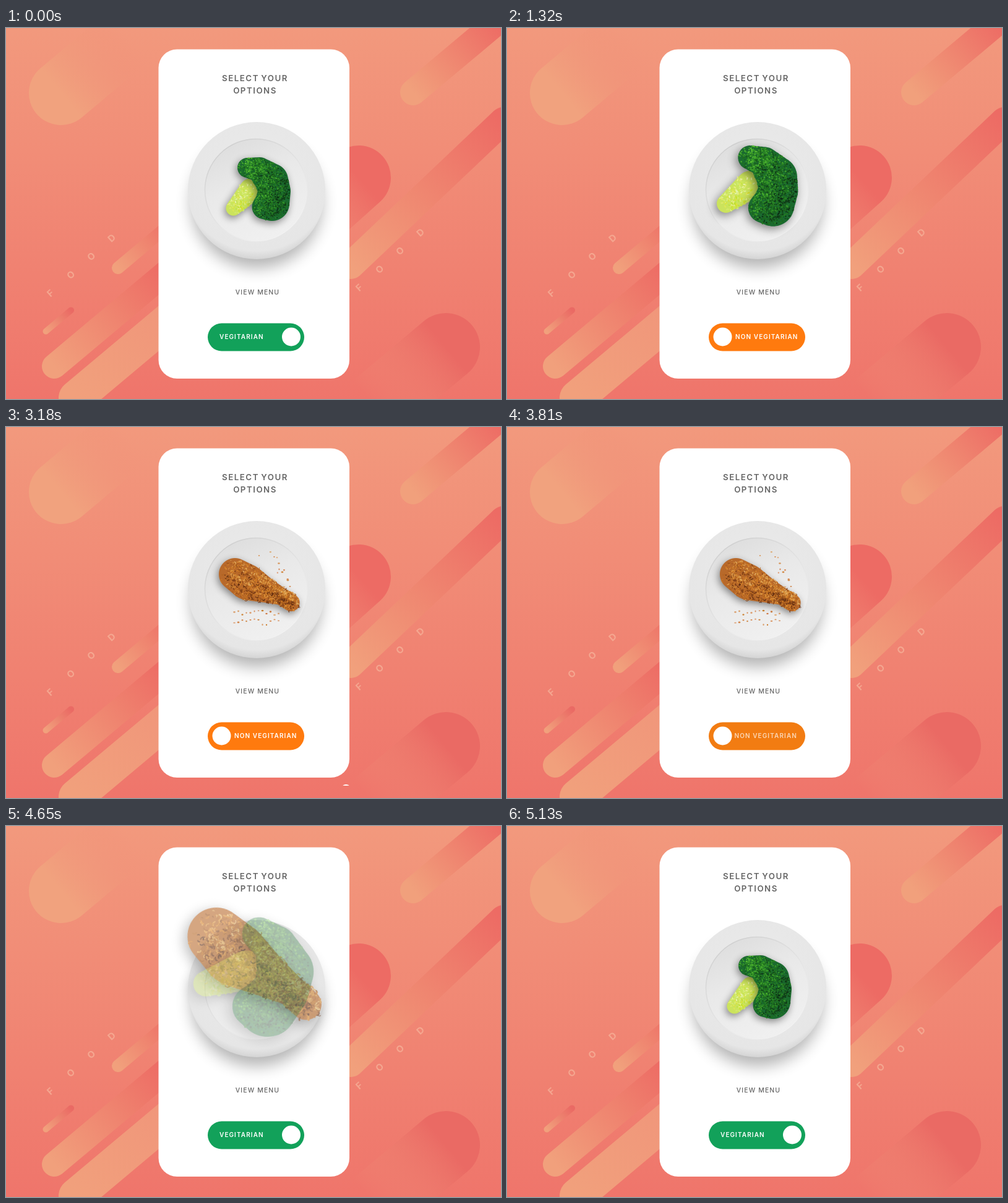
These frames come from a looping animation (800x600 px, 5.79 s). An HTML page with a canvas:

```html
<!DOCTYPE html>
<html lang="en">
<head>
<meta charset="utf-8">
<title>Select your options</title>
<style>
  html, body { margin: 0; width: 100%; height: 100%; overflow: hidden; }
  svg { position: absolute; left: 0; top: 0; }
  text { font-family: Inter, "Open Sans", sans-serif; }
  canvas { position: absolute; left: 300px; top: 160px; width: 220px; height: 200px; }
  .title { font-size: 13.3px; font-weight: 600; letter-spacing: 1.5px; word-spacing: -1.5px; }
  .label { font-size: 10px; font-weight: 600; letter-spacing: 1.1px; fill: #fff; }
  .food { font-size: 15px; font-weight: 700; fill: #f8bfa4; opacity: .6; text-anchor: middle; }
</style>
</head>
<body>
<svg width="800" height="600" viewBox="0 0 800 600">
  <defs>
    <linearGradient id="sky" x2="0" y2="1">
      <stop stop-color="#f2997d"/><stop offset="1" stop-color="#ef756b"/>
    </linearGradient>
    <radialGradient id="rim" cy=".4" r=".62">
      <stop stop-color="#ebebeb"/><stop offset=".87" stop-color="#e6e6e6"/><stop offset="1" stop-color="#cecece"/>
    </radialGradient>
    <linearGradient id="well" x1=".15" x2=".6" y2="1">
      <stop stop-color="#dcdcdc"/><stop offset=".45" stop-color="#e9e9e9"/><stop offset="1" stop-color="#f0f0f0"/>
    </linearGradient>
    <linearGradient id="lip" x1=".1" x2=".8" y2="1">
      <stop stop-color="#cbcbcb"/><stop offset=".6" stop-color="#e6e6e6"/><stop offset="1" stop-color="#f4f4f4"/>
    </linearGradient>
    <filter id="blur" x="-30%" y="-30%" width="160%" height="160%"><feGaussianBlur stdDeviation="13"/></filter>
    <clipPath id="frame"><rect width="800" height="580"/></clipPath>
  </defs>
  <rect width="800" height="600" fill="url(#sky)"/>
  <g id="back"></g>
  <rect x="246.500" y="34.500" width="308.500" height="532.500" rx="30" fill="#fff"/>
  <g fill="#666" text-anchor="middle">
    <text class="title" x="402.500" y="86">SELECT YOUR</text>
    <text class="title" x="402.500" y="106">OPTIONS</text>
    <text x="406.500" y="431" font-size="10.500" font-weight="500" letter-spacing="1.1">VIEW MENU</text>
  </g>
  <circle cx="405" cy="283" r="105" opacity=".3" filter="url(#blur)"/>
  <circle cx="405" cy="263" r="111" fill="url(#rim)"/>
  <circle cx="404" cy="262" r="82.500" fill="url(#well)" stroke="url(#lip)" stroke-width="1.500"/>
  <g id="crumbs"></g>
  <rect id="track" x="326" y="477.500" width="156" height="45" rx="22.500"/>
  <text id="veg" class="label" y="503">VEGITARIAN</text>
  <text id="non" class="label" y="503">NON VEGITARIAN</text>
  <circle id="knob" cy="499.500" r="15" fill="#fff"/>
  <g clip-path="url(#frame)"><circle id="dot" r="8" fill="#fff"/></g>
</svg>
<script>
const $ = id => document.getElementById(id);
const LOOP = 5790, SCALE = 2, TAU = 2 * Math.PI;
const GREEN = [18, 161, 90], ORANGE = [255, 122, 14];
const LIGHT = '#f1a07c', RED = '#ed6b64', CLEAR = '#f0907800';

let seed = 7;
const rand = () => (seed = seed * 16807 % 2147483647) / 2147483647;
const spread = r => (rand() * 2 - 1) * r;
const mix = (a, b, p) => a + (b - a) * p;

// Capsule rising to the right from a round end, with a gradient along its length
function capsule(x, y, r, length, from, to, angle = 40) {
  const id = `cap${x}`, a = angle * Math.PI / 180;
  const x2 = x + length * Math.cos(a), y2 = y - length * Math.sin(a);
  return `<linearGradient id="${id}" gradientUnits="userSpaceOnUse" x1="${x}" y1="${y}" x2="${x2}" y2="${y2}">
    <stop stop-color="${from}"/><stop offset="1" stop-color="${to}"/></linearGradient>
    <path d="M${x} ${y}L${x2} ${y2}" stroke="url(#${id})" stroke-width="${2 * r}" stroke-linecap="round"/>`;
}
const foodWord = (x, y) => [...'FOOD'].map((c, i) =>
  `<text class="food" transform="translate(${x + 33 * i} ${y - 29.700 * i}) rotate(-42)" y="5">${c}</text>`).join('');

$('back').innerHTML =
  capsule(89, 105, 52, 140, '#f1a27e', CLEAR) +
  capsule(658, 104, 21, 180, LIGHT, RED) +
  capsule(570, 242, 52, 200, RED, CLEAR, 222) +
  capsule(557, 384, 22, 340, LIGHT, RED, 43.500) +
  capsule(711, 516, 55, 150, '#ea6a64', CLEAR, 220) +
  capsule(181, 388, 10, 120, LIGHT, RED) +
  capsule(64.500, 490.500, 5, 53, LIGHT, '#ea6a64') +
  capsule(78, 547, 20, 240, LIGHT, RED) +
  capsule(113, 598, 28, 270, LIGHT, '#f0937a') +
  foodWord(72, 429) + foodWord(571, 420);

// Food bodies are chains of discs [x, y, r]; p from 0 to 1 runs along the chain
function discAt(chain, p) {
  const q = p * (chain.length - 1), i = Math.min(chain.length - 2, Math.floor(q));
  return chain[i].map((v, k) => mix(v, chain[i + 1][k], q - i));
}
function fillChain(g, chain, color) {
  const path = new Path2D();
  for (let p = 0; p <= 1; p += .02) {
    const [x, y, r] = discAt(chain, p);
    path.moveTo(x + r, y);
    path.arc(x, y, r, 0, TAU);
  }
  g.shadowColor = 'rgba(0,0,0,.45)';
  g.shadowBlur = 12 * SCALE;
  g.shadowOffsetX = -2 * SCALE;
  g.shadowOffsetY = 4 * SCALE;
  g.fillStyle = color;
  g.fill(path);
  g.shadowColor = 'transparent';
}
// Calls draw(x, y, u, v) at random points; u, v is the place within the disc, -1 to 1
function scatter(chain, count, draw) {
  while (count--) {
    const [x, y, r] = discAt(chain, rand());
    const d = Math.sqrt(rand()), a = rand() * TAU;
    const u = d * Math.cos(a), v = d * Math.sin(a);
    draw(x + u * r, y + v * r, u, v);
  }
}
function curl(g, x, y, r, sweep, width, color) {
  const turn = rand() * TAU;
  g.strokeStyle = color;
  g.lineWidth = width;
  g.beginPath();
  g.arc(x, y, r, turn, turn + sweep);
  g.stroke();
}
function sprite(px, py) {
  const el = document.createElement('canvas');
  el.width = 220 * SCALE;
  el.height = 200 * SCALE;
  el.style.transformOrigin = `${px - 300}px ${py - 160}px`;
  document.body.append(el);
  const g = el.getContext('2d');
  g.setTransform(SCALE, 0, 0, SCALE, -300 * SCALE, -160 * SCALE);
  g.lineCap = 'round';
  return g;
}

function drawChicken() {
  const g = sprite(420, 263);
  const body = [[370, 238, 26], [390, 251, 29], [420, 264, 20], [445, 274, 14], [462, 285, 14]];
  fillChain(g, body, '#b8692a');
  scatter(body, 1300, (x, y, u, v) => {
    const light = 43 + Math.sin(x / 6 - y / 4) * 7 - v * 7 + spread(17);
    curl(g, x, y, .8 + rand() * 1.800, 1.800, .6 + rand(), `hsl(${13 + light * .36},70%,${light}%)`);
  });
  return g.canvas;
}

function drawBroccoli() {
  const g = sprite(408, 261);
  const stem = [[396, 262, 19], [367, 292, 12]];
  const crown = [[390, 226, 16], [410, 229, 20], [429, 246, 27], [434, 264, 26], [430, 284, 28], [416, 290, 19]];
  fillChain(g, stem, '#cbe35c');
  scatter(stem, 160, (x, y, u, v) =>
    curl(g, x, y, 2, 1, 1.500, `hsl(${68 + spread(8)},75%,${66 - v * 10 + spread(14)}%)`));
  fillChain(g, crown, '#1a6a2f');
  scatter(crown, 2200, (x, y, u, v) => {
    const lump = Math.sin(x / 5 + y / 9) * Math.cos(y / 6 - x / 11);
    const light = 29 - (x - 415) * .13 - (y - 260) * .04 - u * 3 - v * 4 + lump * 5 + spread(13);
    curl(g, x, y, .5, TAU, .4 + rand(), `hsl(${142 - light * .8},58%,${Math.max(11, light)}%)`);
  });
  return g.canvas;
}

function crumb(x, y) {
  return `<ellipse cx="${x}" cy="${y}" rx="${1 + rand()}" ry="${.8 + rand() * .7}"
    fill="hsl(${22 + rand() * 10},60%,${50 + rand() * 22}%)"/>`;
}
for (let i = 0; i < 12; i++)
  $('crumbs').innerHTML += crumb(420 + i * 3 + spread(11), 203 + i * 4.500 + spread(6))
    + crumb(369 + i * 6.500, 297 + rand() * 7) + crumb(369 + i * 6.500, 309 + rand() * 12);

const chicken = drawChicken(), broccoli = drawBroccoli();

const part = (t, a, b) => Math.min(1, Math.max(0, (t - a) / (b - a)));
const ease = (t, a, b) => .5 - Math.cos(part(t, a, b) * Math.PI) / 2;
const speedUp = (t, a, b) => part(t, a, b) ** 2;
const slowDown = (t, a, b) => 1 - (1 - part(t, a, b)) ** 2;

function set(id, attrs) {
  for (const name in attrs) $(id).setAttribute(name, attrs[name]);
}
function place(el, grow, spin, lift, opacity) {
  el.style.transform = `translateY(${-lift * grow}px) rotate(${spin * grow}deg) scale(${1 + grow})`;
  el.style.opacity = opacity;
}

function drawToggle(t) {
  const slide = ease(t, 900, 1320) - ease(t, 3960, 4390);
  const tint = ease(t, 660, 1260) - ease(t, 3720, 4320);
  const veg = 1 - ease(t, 660, 900) + ease(t, 4140, 4440);
  const non = ease(t, 1080, 1320) - ease(t, 3720, 3960);
  set('knob', { cx: mix(461, 348.500, slide) });
  set('track', { fill: `rgb(${GREEN.map((v, i) => Math.round(mix(v, ORANGE[i], tint)))})` });
  set('veg', { opacity: veg, x: 345 + 5 * (1 - veg) });
  set('non', { opacity: non, x: 369 - 5 * (1 - non) });
}

function drawDot(t) {
  const second = t >= 3180, start = second ? 3180 : 240;
  const p = ease(t, start, start + 360);
  set('dot', {
    cx: second ? mix(549.500, 348.500, p) : mix(503, 461, p),
    cy: mix(586, 499.500, p),
    opacity: t >= start && t < start + 360 ? 1 : 0
  });
}

function drawFood(t) {
  const first = t < 3000;
  const leaf = first ? .75 * speedUp(t, 1180, 1440) : .85 * (1 - slowDown(t, 4600, 5130));
  const leg = first ? .9 * (1 - slowDown(t, 1410, 1710)) : 1.250 * speedUp(t, 4300, 4740);
  const leafShow = 1 - part(t, 1365, 1470) + part(t, 4600, 4760);
  const legShow = part(t, 1410, 1500) - part(t, 4580, 4750);
  place(broccoli, leaf, 40, 28, leafShow);
  place(chicken, leg, 13, 31, legShow);
  set('crumbs', { opacity: legShow * Math.max(0, 1 - 4 * leg) });
}

let begin;
function frame(now) {
  begin ??= now;
  const t = (now - begin) % LOOP;
  drawToggle(t);
  drawDot(t);
  drawFood(t);
  requestAnimationFrame(frame);
}
requestAnimationFrame(frame);
</script>
</body>
</html>
```
